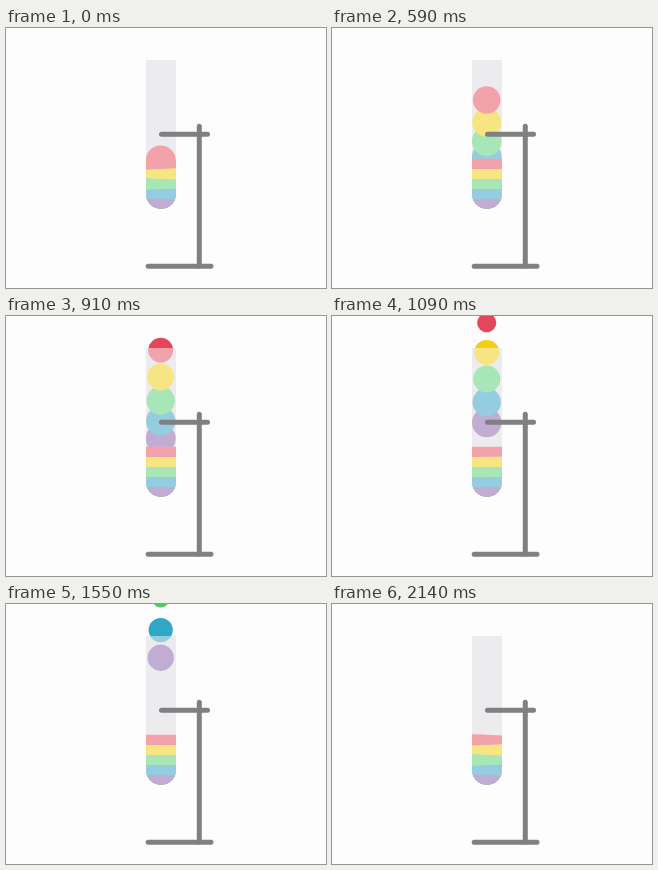
These frames come from a looping animation (320 px wide and 260 px high, 2190 ms). An HTML page with a canvas:

```html
<!DOCTYPE html>
<html lang="en">
<head>
<meta charset="utf-8">
<title>Rainbow test tube</title>
<style>
  html, body { margin: 0; width: 100%; height: 100%; overflow: hidden; background: #fefdfe; }
  canvas { display: block; }
</style>
</head>
<body>
<canvas id="stage" width="320" height="260"></canvas>
<script>
const ctx = document.getElementById('stage').getContext('2d');
const LOOP = 2190, STAGGER = 195;
const vivid = ['#e44759', '#efd012', '#4ccb6c', '#2fa8c4', '#8558a2'];
const pale = ['#f2a2ab', '#f7e584', '#a6e6b7', '#95cde0', '#c1acd4'];

const tube = new Path2D();
tube.moveTo(140, 32);
tube.lineTo(170, 32);
tube.lineTo(170, 166);
tube.arc(155, 166, 15, 0, Math.PI);
tube.closePath();

// Rise accelerates; the ball shrinks faster once it leaves the tube.
function ball(t, i) {
  const u = Math.max(-0.4, (t - i * STAGGER) / 1000);
  return {
    y: 132.5 - 70.5 * u - 41 * u * u,
    r: Math.max(0, Math.min(15 - 3.1 * u * u, 12 - 20 * (u - 0.97)))
  };
}

function drawBalls(t, colors) {
  for (let i = 4; i >= 0; i--) {
    const { y, r } = ball(t, i);
    ctx.fillStyle = colors[i];
    ctx.beginPath();
    ctx.arc(154.7, y, r, 0, 2 * Math.PI);
    ctx.fill();
  }
}

// The surfaces sway slightly around the loop seam.
function drawLayers(t) {
  const fromSeam = t > LOOP / 2 ? t - LOOP : t;
  const sway = 0.7 * Math.max(0, Math.cos(2 * Math.PI * (fromSeam + 25) / 1460));
  pale.forEach((color, i) => {
    const top = 130.8 + 10.1 * i;
    const tilt = i % 2 ? -sway : sway;
    ctx.fillStyle = color;
    ctx.beginPath();
    ctx.moveTo(139, top - tilt);
    ctx.quadraticCurveTo(155, top - tilt / 2, 171, top + tilt);
    ctx.lineTo(171, 182);
    ctx.lineTo(139, 182);
    ctx.fill();
  });
}

function bar(x1, y1, x2, y2) {
  ctx.beginPath();
  ctx.moveTo(x1, y1);
  ctx.lineTo(x2, y2);
  ctx.stroke();
}

function drawStand() {
  ctx.strokeStyle = '#807f82';
  ctx.lineWidth = 5;
  ctx.lineCap = 'round';
  bar(193.3, 98.3, 193.3, 238);
  bar(155.5, 106.2, 201.5, 106.2);
  bar(142.2, 238.3, 205, 238.3);
}

function draw(ms) {
  // The balls run a little ahead in the first half of the loop.
  const lead = Math.max(0, Math.min(ms / 590, (910 - ms) / 320));
  const t = ms + 38 * lead;
  ctx.fillStyle = '#fefdfe';
  ctx.fillRect(0, 0, 320, 260);
  ctx.save();
  ctx.beginPath();
  ctx.rect(0, 0, 320, 32);
  ctx.clip();
  drawBalls(t, vivid);
  ctx.restore();

  ctx.fillStyle = '#ecebee';
  ctx.fill(tube);
  ctx.save();
  ctx.clip(tube);
  drawBalls(t, pale);
  drawLayers(ms);
  ctx.restore();
  drawStand();
}

const start = performance.now();
function frame() {
  draw((performance.now() - start) % LOOP);
  requestAnimationFrame(frame);
}
frame();
</script>
</body>
</html>
```
